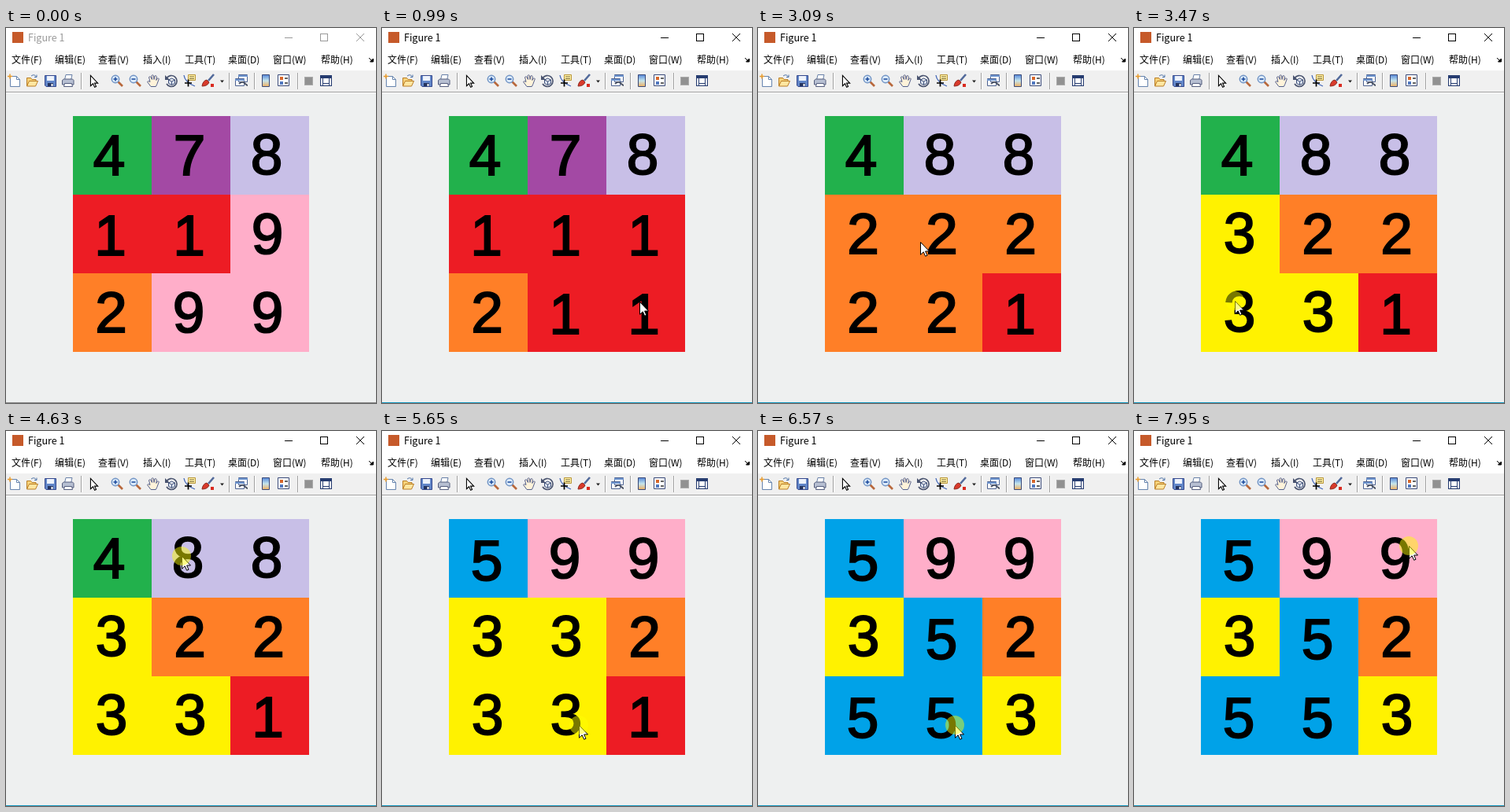
Recreate the animation shown at these times as an HTML page. Size 470 by 477 pixels, loop 8000 ms.

```html
<!DOCTYPE html>
<html lang="zh">
<head>
<meta charset="utf-8">
<title>Figure 1</title>
<style>
  html, body { margin: 0; width: 100%; height: 100%; overflow: hidden; background: #eef0f0; }
  svg { display: block; width: 100%; height: 100%; }
  .ui { font: 12px "Noto Sans CJK SC", "Noto Sans CJK", "Noto Sans", sans-serif; }
  .title { font-size: 12.5px; }
  .digit { font: 73px "Liberation Sans", Arial, sans-serif; text-anchor: middle; stroke: #000; stroke-width: 2; }
  .crisp { shape-rendering: crispEdges; }
</style>
</head>
<body>
<svg viewBox="0 0 470 477" xmlns="http://www.w3.org/2000/svg">
  <defs>
    <g id="lens" fill="none">
      <path d="M9.5 9.5 15 15" stroke="#b8683c" stroke-width="2.6"/>
      <circle cx="6" cy="6" r="4.7" fill="#dcebfa" stroke="#7093c4" stroke-width="1.5"/>
      <path d="M3.5 6h5" stroke="#2450a0" stroke-width="1.6"/>
    </g>
    <path id="pointer" d="M.5 .5V16.3L4.2 12.8 6.7 18.3 9 17.3 6.6 12H11.5Z"/>
  </defs>

  <rect width="470" height="477" fill="#eef0f0"/>
  <rect width="470" height="54" fill="#fff"/>
  <rect y="54" width="470" height="27" fill="#f0f0f0"/>
  <g class="crisp">
    <rect y="81" width="470" height="1" fill="#a0a0a0"/>
    <rect y="82" width="470" height="1" fill="#fff"/>
    <rect id="border" y="476" width="470" height="1"/>
  </g>

  <rect x="8" y="5" width="14" height="14" fill="#c65a2a"/>
  <text id="title" class="ui title" x="28" y="17">Figure 1</text>
  <g id="buttons" fill="none">
    <path class="crisp" d="M354 12.5h10M399.5 7.5h9v9h-9z"/>
    <path d="M445 7l10 10M455 7l-10 10"/>
  </g>
  <g id="menu" class="ui"></g>
  <path d="M461 38l4 4M466.5 39v4h-4z" stroke="#000" fill="#000"/>

  <g id="toolbar" fill="none">
    <g id="separators" class="crisp"></g>
    <path d="M5.500 61.500h8l4 4v9h-12z" fill="#fff" stroke="#6684ae"/>
    <path d="M13.500 61.500v4h4" stroke="#6684ae"/>
    <path d="M5 58.500v6M2 61.500h6" stroke="#e89b2c" stroke-width="1.500"/>

    <path d="M26.500 74V63.500h5l1.500 2h5v3" fill="#f7d27a" stroke="#b97d25"/>
    <path d="M26.500 74l3-6.500h11l-3 6.500z" fill="#ffe6a0" stroke="#b97d25"/>
    <path d="M32 61q4-3 6.500 1M39 59.500v3h-3" stroke="#4e73a8"/>

    <path d="M49.500 60.500h14v14h-12.500l-1.500-1.500z" fill="#6286c8" stroke="#34478c"/>
    <path d="M52 61h9v6h-9z" fill="#eef3fc"/>
    <path d="M53 70h7v4h-7z" fill="#25345f"/>
    <path d="M57.500 71h2v3h-2z" fill="#fff"/>

    <path d="M74.500 66l1.500-6.500h8l-1.500 6.500" fill="#fff" stroke="#6880a8"/>
    <path d="M71.500 66.500l2-1.500h11l1.500 1.500v5.500h-14.500z" fill="#b7bfd2" stroke="#535c7d"/>
    <path d="M74.500 70.500h9l1 4h-11z" fill="#fff" stroke="#535c7d"/>

    <use href="#pointer" transform="translate(107 60) scale(.84)" fill="#fff" stroke="#000" stroke-width="1.300"/>
    <use href="#lens" x="133" y="59"/>
    <path d="M139 62.500v5" stroke="#2450a0" stroke-width="1.600"/>
    <use href="#lens" x="156" y="59"/>

    <path d="M184 74.500l-4.500-6q1-2 3.500 0l-1.500-6q1.500-1.500 2.500 0l1.500 3-.5-5q1.500-1.500 2.500 0l.5 5 1-4.500q1.500-1 2.300.5l-.5 5 1.500-2.500q1.500-.5 2 .8l-2.500 6.700-1.500 3z" fill="#fff3da" stroke="#55608c"/>

    <path d="M204 64a7 7 0 1 1 0 7" stroke="#49536f" stroke-width="1.700"/>
    <path d="M202 60v6h6z" fill="#49536f"/>
    <path d="M206.500 66l4-2 4 2v4.500l-4 2-4-2zM206.500 66l4 2 4-2M210.500 68v4" fill="#d8e2f2" stroke="#405078"/>

    <path d="M231.500 59.500h9v7h-9z" fill="#fff1a8" stroke="#b89538"/>
    <path d="M233 62h6M233 64.500h6" stroke="#7d6b35"/>
    <path d="M226 60q1 9 14 14" stroke="#4468b8" stroke-width="1.300"/>
    <path d="M231.500 65.500v9M227 70h9" stroke="#000" stroke-width="1.700"/>

    <path d="M257 67l7-8" stroke="#51699a" stroke-width="2.600"/>
    <path d="M249 74q1-7 6-8l3 3q-2 5-9 5z" fill="#d93a2b" stroke="#8d2a20"/>
    <path d="M260 71h4v4h-4z" fill="#d92b20"/>
    <path d="M272 66.500h5l-2.500 3z" fill="#222"/>

    <path d="M295.500 59.500h11v9h-11zM291.500 64.500h11v9h-11z" fill="#fff" stroke="#4c6190"/>
    <path d="M295 61h12M291 66h12" stroke="#6f96d0" stroke-width="2"/>
    <path d="M296 71q4-4 7-1t4 3" stroke="#4b5263" stroke-width="1.800"/>

    <path d="M325.500 59.500h9v15h-9z" fill="url(#bar)" stroke="#394978"/>
    <linearGradient id="bar" x2="0" y2="1">
      <stop stop-color="#5486d8"/><stop offset=".5" stop-color="#c4e5ed"/><stop offset="1" stop-color="#f0b060"/>
    </linearGradient>

    <path d="M345.500 59.500h14v14h-14z" fill="#fff" stroke="#394978"/>
    <path d="M348 62h4v4h-4z" fill="#d9682b"/>
    <path d="M348 68h4v4h-4z" fill="#5078c0"/>
    <path d="M354 64h4M354 70h4" stroke="#333" stroke-width="1.500"/>

    <path class="crisp" d="M379.500 62.500h10v10h-10z" fill="#919191" stroke="#aaa"/>
    <path class="crisp" d="M399.500 60.500h14v13h-14z" fill="#fff" stroke="#263c70"/>
    <path class="crisp" d="M399 61h15v3h-15z" fill="#263c70"/>
    <path class="crisp" d="M402.500 64v9M410.500 64v9M402 70.500h9" stroke="#263c70"/>
  </g>

  <g id="board"></g>
  <use id="cursor" href="#pointer" fill="#fff" stroke="#000"/>
  <circle id="press" r="12" fill="#ff0" fill-opacity=".47"/>
</svg>
<script>
const LOOP = 8000, FOCUS_TIME = 840, STEP = 76.5;
const byId = id => document.getElementById(id);
const set = (node, attrs) => {
  for (const name in attrs) node.setAttribute(name, attrs[name]);
  return node;
};
const add = (parent, tag, attrs, text = "") => {
  const node = set(document.createElementNS("http://www.w3.org/2000/svg", tag), attrs);
  node.textContent = text;
  return parent.appendChild(node);
};

[["文件(F)", 7], ["编辑(E)", 62], ["查看(V)", 117], ["插入(I)", 174],
 ["工具(T)", 227], ["桌面(D)", 282], ["窗口(W)", 339], ["帮助(H)", 400]]
  .forEach(([label, x]) => add(byId("menu"), "text", { x, y: 45 }, label));

for (const x of [95, 283, 315, 370]) {
  add(byId("separators"), "rect", { x, y: 57, width: 1, height: 21, fill: "#a0a0a0" });
  add(byId("separators"), "rect", { x: x + 1, y: 57, width: 1, height: 21, fill: "#fff" });
}

// Per digit: tile colour, glyph centre and baseline inside the tile.
const tiles = {
  1: ["#ed1c24", 47.5, 77], 2: ["#ff7f27", 48.5, 75], 3: ["#fff200", 49, 74],
  4: ["#22b14c", 46, 75], 5: ["#00a2e8", 48, 77.5], 7: ["#a349a4", 48, 75],
  8: ["#c8bfe7", 46, 73.5], 9: ["#ffaec9", 47, 74.5]
};
const startBoard = [4, 7, 8, 1, 1, 9, 2, 9, 9];
const cells = startBoard.map((_, i) => {
  const x = 85 + i % 3 * 100, y = 112 + Math.floor(i / 3) * 100;
  const rect = add(byId("board"), "rect", { class: "crisp", x, y, width: 100, height: 100 });
  return { x, y, rect, text: add(byId("board"), "text", { class: "digit" }) };
});

// Press time, board update time, release time, clicked cell.
const clicks = [
  [840, 990, 990, 8], [2310, 2380, 2460, 4], [3470, 3470, 3550, 6], [4630, 4700, 4780, 1],
  [5650, 5710, 5790, 7], [6570, 6570, 6720, 7], [7950, LOOP, LOOP, 2]
];

// Start time, number of steps, points passed through.
const moves = [
  [210, 4, [392, 500], [324, 348]],
  [840, 1, [324, 348], [327, 348]],
  [1140, 1, [327, 348], [329, 348]],
  [1620, 9, [329, 348], [232, 247]],
  [3090, 4, [232, 247], [128, 347]],
  [3780, 11, [128, 347], [239, 122], [223, 159]],
  [5240, 4, [223, 159], [250, 374]],
  [6950, 4, [250, 374], [374, 119]],
  [7340, 5, [374, 119], [349, 146]]
];

function boardAt(time) {
  const board = [...startBoard];
  for (const [, update, , clicked] of clicks) {
    if (time < update) break;
    board.forEach((value, i) => {
      const distance = Math.abs(i % 3 - clicked % 3) +
        Math.abs(Math.floor(i / 3) - Math.floor(clicked / 3));
      if (distance < 2) board[i] = value % 9 + 1;
    });
  }
  return board;
}

function cursorAt(time) {
  const move = moves.filter(([start]) => time >= start).pop();
  if (!move) return null;
  const [start, steps, ...points] = move;
  const done = Math.min(1, (Math.floor((time - start + 4) / STEP) + 1) / steps);
  const along = done * (points.length - 1);
  const leg = Math.min(Math.floor(along), points.length - 2);
  return points[leg].map((v, axis) => Math.round(v + (points[leg + 1][axis] - v) * (along - leg)));
}

function draw(time) {
  const focused = time >= FOCUS_TIME;
  const ink = focused ? "#000" : "#999";
  set(byId("title"), { fill: ink });
  set(byId("buttons"), { stroke: ink });
  set(byId("border"), { fill: focused ? "#1899c0" : "#8a8a8a" });

  boardAt(time).forEach((value, i) => {
    const { x, y, rect, text } = cells[i];
    const [fill, dx, dy] = tiles[value];
    set(rect, { fill });
    set(text, { x: x + dx, y: y + dy });
    text.textContent = value;
  });

  const tip = cursorAt(time);
  const pressed = clicks.some(([down, , up]) => time >= down && time < up);
  set(byId("cursor"), { visibility: tip ? "visible" : "hidden" });
  set(byId("press"), { visibility: pressed ? "visible" : "hidden" });
  if (tip) {
    set(byId("cursor"), { x: tip[0], y: tip[1] });
    set(byId("press"), { cx: tip[0], cy: tip[1] });
  }
}

const origin = performance.now();
function tick() {
  draw((performance.now() - origin) % LOOP);
  requestAnimationFrame(tick);
}
tick();
</script>
</body>
</html>
```
